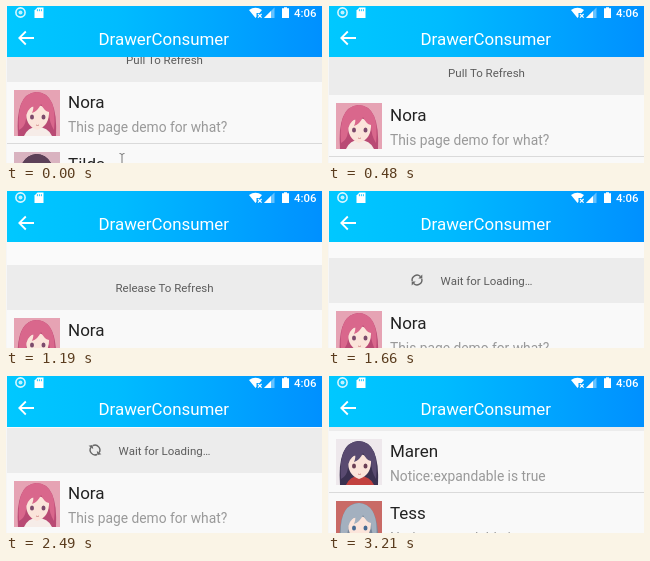
An HTML page for the animation above (3.31 s loop, 316 by 157 pixels).

```html
<!DOCTYPE html>
<html lang="en">
<head>
<meta charset="utf-8">
<title>Pull to refresh</title>
<style>
  html, body { margin: 0; width: 100%; height: 100%; overflow: hidden; background: #fafafa; }
  svg { display: block; width: 100%; height: 100%; }
  text { font-family: Roboto, sans-serif; }
  .name { font-size: 17px; fill: #222; }
  .note { font-size: 13.8px; fill: #999; }
  #label { font-size: 11.5px; fill: #5c5c5c; text-anchor: middle; }
</style>
</head>
<body>
<svg viewBox="0 0 316 157">
  <defs>
    <linearGradient id="sky">
      <stop offset="0" stop-color="#00c8ff"/>
      <stop offset=".35" stop-color="#00bcff"/>
      <stop offset="1" stop-color="#0090ff"/>
    </linearGradient>
    <clipPath id="frame"><rect width="46" height="46"/></clipPath>
  </defs>

  <rect width="316" height="157" fill="#fafafa"/>

  <g id="list">
    <rect x="1" y="-45" width="315" height="45" fill="#ececec"/>
    <text id="label" x="158.5" y="-18.3"></text>
    <g id="spinner" fill="none" stroke="#666" stroke-width="1.4">
      <path d="M-4.8 1.2A5 5 0 0 1 3.4 -3.6M4.8 -1.2A5 5 0 0 1 -3.4 3.6"/>
      <path d="M5.3 -5.6V-1.6H1.3ZM-5.3 5.6V1.6H-1.3Z" fill="#666" stroke="none"/>
    </g>
    <g id="before"></g>
    <g id="after"></g>
  </g>

  <path id="cursor" d="M-2.5 -5.5Q0 -5.5 0 -4Q0 -5.5 2.5 -5.5M0 -4V4M-2.5 5.5Q0 5.5 0 4Q0 5.5 2.5 5.5"
        fill="none" stroke="#777" stroke-width="1"/>

  <rect x="1" width="315" height="51" fill="url(#sky)"/>
  <rect width="1" height="157" fill="#f6f6f6"/>

  <g fill="#fff">
    <circle cx="14.5" cy="6.5" r="4.6" fill="none" stroke="#fff" stroke-width="1.6" stroke-opacity=".85"/>
    <circle cx="14.5" cy="6.5" r="2" fill-opacity=".75"/>
    <path d="M31.5 1.5H37.5V12H28.5V4.5Z"/>
    <path d="M31.4 3.2v2M33.4 3.2v2M35.4 3.2v2" stroke="#00c4ff" stroke-width=".9"/>
    <path d="M243 4Q249.500 -.5 256 4L253.500 7H250.500V10.800L249.500 12Z"/>
    <path d="M252 8L255.600 11.600M255.600 8L252 11.600" stroke="#fff" stroke-width="1.2"/>
    <path d="M268.500 1.500V12H258Z" fill-opacity=".4"/>
    <path d="M265 5V12H258Z"/>
    <path d="M278 1.200H281V2.300H283V12H276V2.300H278Z"/>
    <text x="288" y="11" font-size="11.4" font-weight="500">4:06</text>
    <path d="M28 32H13.500M19.800 25.500L13.300 32L19.800 38.500" fill="none" stroke="#fff" stroke-width="1.8"/>
    <text x="92.500" y="38.700" font-size="16.9">DrawerConsumer</text>
  </g>
</svg>

<script>
const LOOP = 3310, ROW = 62, REFRESHED = 2970;
const PULL = 'Pull To Refresh', RELEASE = 'Release To Refresh';
const WAIT = 'Wait for Loading…', DONE = 'Refresh Success';

// start time in ms, top of the first row, header label, spinner angle
const steps = [
  [0, 76, PULL], [120, 78, PULL], [240, 81, PULL], [360, 85, PULL],
  [480, 89, PULL], [600, 95, PULL],
  [720, 101, RELEASE], [840, 106, RELEASE], [960, 111, RELEASE],
  [1080, 115, RELEASE], [1190, 119, RELEASE],
  [1660, 112, WAIT, -180], [1780, 102, WAIT, -120], [1900, 98, WAIT, -60],
  [2020, 97, WAIT, 0], [2140, 97, WAIT, 60], [2260, 97, WAIT, 120],
  [2380, 97, WAIT, 200], [2490, 97, WAIT, 260],
  [2970, 97, DONE], [3090, 74, DONE], [3210, 55, DONE]
];

const looks = {
  pink:   { back: '#e6a3b4', hair: '#d9678c', shade: '#b94a74', top: '#f6ece8', eye: '#7c4a6c' },
  plum:   { back: '#d9b3c0', hair: '#5c4058', shade: '#3f2c42', top: '#c8506a', eye: '#5a3550' },
  violet: { back: '#eee8ec', hair: '#594a70', shade: '#3a3150', top: '#c2413f', eye: '#6b3f55' },
  silver: { back: '#c96a66', hair: '#a3b0bf', shade: '#78879a', top: '#e9e5e6', eye: '#486a92' }
};

function avatar(look) {
  const { back, hair, shade, top, eye } = looks[look];
  return `<g transform="translate(8 8)" clip-path="url(#frame)">
    <rect width="46" height="46" fill="${back}"/>
    <path d="M4 46Q1 4 22 2Q44 2 42 46Z" fill="${shade}"/>
    <path d="M10 46Q14 37 23 37Q34 37 38 46Z" fill="${top}"/>
    <path d="M12 20Q11 36 23 40Q36 36 35 20Q24 11 12 20Z" fill="#fbe4da"/>
    <path d="M5 40Q2 3 23 2Q44 4 40 40Q35 32 35 22Q30 21 27 14Q24 21 18 23Q20 18 19 16Q12 20 12 29Q11 37 5 40Z" fill="${hair}"/>
    <ellipse cx="18" cy="27" rx="2" ry="2.600" fill="${eye}"/>
    <ellipse cx="29.500" cy="27" rx="2" ry="2.600" fill="${eye}"/>
    <path d="M22 35Q23.500 36 25 35" fill="none" stroke="#c97a78" stroke-width=".8"/>
  </g>`;
}

function row([name, note, look], i) {
  return `<g transform="translate(0 ${i * ROW})">
    <rect x="1" width="315" height="${ROW}" fill="#f9f9f9"/>
    <rect x="1" y="${ROW - 1}" width="315" height="1" fill="#dadada"/>
    ${avatar(look)}
    <text class="name" x="62" y="26">${name}</text>
    <text class="note" x="62" y="50">${note}</text>
  </g>`;
}

const el = id => document.getElementById(id);
const show = (node, on) => node.setAttribute('visibility', on ? 'visible' : 'hidden');
const move = (node, x, y, turn = 0) =>
  node.setAttribute('transform', `translate(${x} ${y}) rotate(${turn})`);

const [list, label, spinner, before, after, cursor] =
  ['list', 'label', 'spinner', 'before', 'after', 'cursor'].map(el);

const demo = 'This page demo for what?', notice = 'Notice:expandable is true';
before.innerHTML = [['Nora', demo, 'pink'], ['Tilda', notice, 'plum']].map(row).join('');
after.innerHTML = [['Maren', notice, 'violet'], ['Tess', notice, 'silver']].map(row).join('');

function draw(t) {
  const [, y, text, angle] = steps.findLast(s => s[0] <= t);
  move(list, 0, y);
  if (label.textContent !== text) label.textContent = text;
  show(spinner, text === WAIT);
  move(spinner, 89, -23, angle);
  show(before, t < REFRESHED);
  show(after, t >= REFRESHED);
  // the pointer runs ahead of the list, which resists the pull
  show(cursor, text === PULL);
  move(cursor, 116, 153 + 2 * (y - 76));
}

const start = performance.now();
function tick() {
  draw((performance.now() - start) % LOOP);
  requestAnimationFrame(tick);
}
draw(0);
requestAnimationFrame(tick);
</script>
</body>
</html>
```
